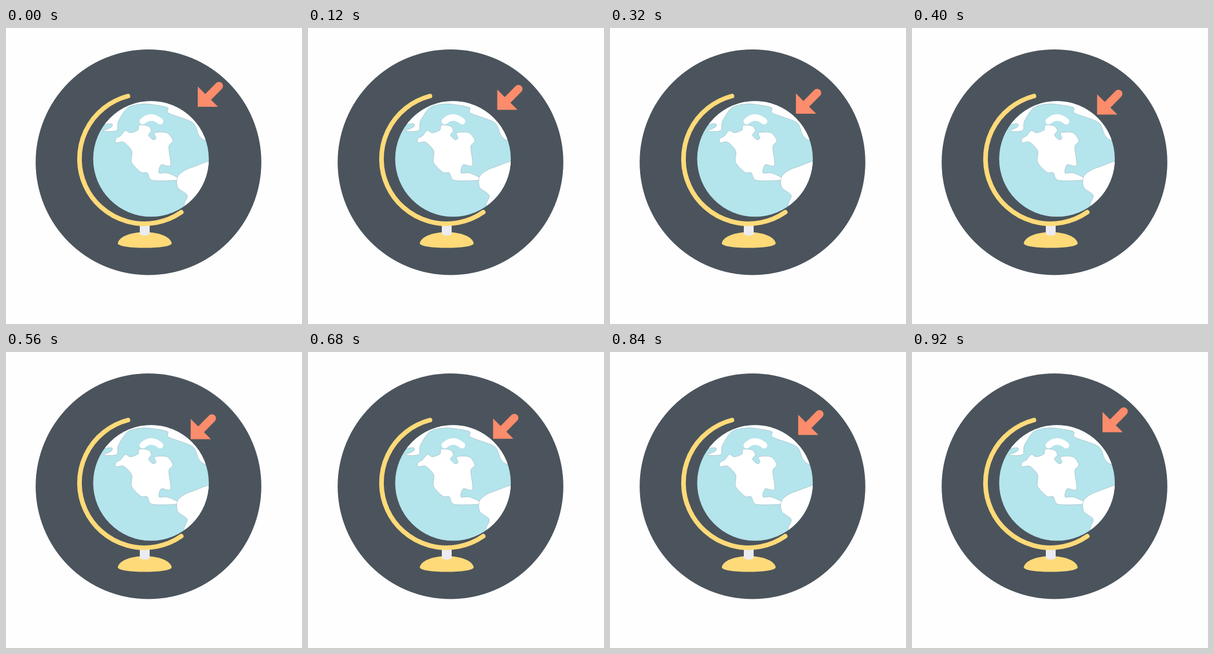
Write an HTML page that moves like this. It is 511 px wide and 511 px high and loops after 960 ms.

```html
<!DOCTYPE html>
<html lang="en">
<head>
<meta charset="utf-8">
<title>Globe</title>
<style>
  html, body { margin: 0; width: 100%; height: 100%; overflow: hidden; background: #fefefe; }
  svg { display: block; width: 100%; height: 100%; }
</style>
</head>
<body>
<svg viewBox="0 0 511 511">
  <clipPath id="ball"><circle cx="250.3" cy="226" r="99.8"/></clipPath>
  <circle cx="246" cy="231.7" r="194.8" fill="#4b545c"/>
  <path d="M193 371.500C195 360.500 214 352.500 239.500 352.500S284 360.500 286 371.500C286 377 264 379.500 239.500 379.500S193 377 193 371.500Z" fill="#ffda79"/>
  <path d="M231 340H248V356Q239.500 361 231 356Z" fill="#ebebf1"/>
  <path d="M210.500 117.500A112 112 0 1 0 302.500 318" fill="none" stroke="#ffda79" stroke-width="8" stroke-linecap="round"/>
  <circle cx="250.3" cy="226" r="99.8" fill="#b4e4ec"/>
  <g clip-path="url(#ball)">
    <g id="land" fill="#fff" stroke="#8ba5ac" stroke-width=".5"></g>
    <path d="M236 161Q250 148 266 161" fill="none" stroke="#fff" stroke-width="11" stroke-linecap="round"/>
  </g>
  <g id="arrow" fill="#fb8c6c">
    <path d="M331 101V136H366Z"/>
    <path d="M346 122L367.700 100" stroke="#fb8c6c" stroke-width="14" stroke-linecap="round"/>
  </g>
</svg>
<script>
  // Key points of each coast; corners beyond the rim are clipped by the globe.
  const coasts = [
    '140,168 180,165 182,171 168,178 191,177 194,161 211,137 240,131 278,137 281,147 322,163 333,185 346,194 380,190 250,80',
    '190,191 198,186 206,177 215,181 228,176 230,168 245,169 251,177 246,185 254,193 259,190 257,181 278,181 288,195 281,205 284,237 268,236 264,250 276,250 288,254 298,262 253,263 244,250 233,249 217,232 217,212 203,197 190,198',
    '295,262 300,252 320,241 380,227 350,310 309,308 313,289 297,276'
  ];

  // Closed curve through the points, slightly rounded.
  function curve(text) {
    const p = text.split(' ').map(s => s.split(',').map(Number));
    const at = i => p[(i + p.length) % p.length];
    const handle = (i, s) => at(i).map((v, k) => v + s * (at(i + 1)[k] - at(i - 1)[k]) / 7);
    return 'M' + p[0] + p.map((_, i) =>
      'C' + [handle(i, 1), handle(i + 1, -1), at(i + 1)].join(' ')).join('') + 'Z';
  }

  const land = document.getElementById('land');
  for (const coast of coasts) {
    const path = document.createElementNS('http://www.w3.org/2000/svg', 'path');
    path.setAttribute('d', curve(coast));
    land.append(path);
  }

  const LOOP = 960, STEP = 40, ARRIVE = 520, LEAVE = 600;
  const arrow = document.getElementById('arrow');

  // 0 = away from the globe, 1 = touching it.
  function progress(t) {
    if (t < ARRIVE) return Math.sin(Math.PI / 2 * t / ARRIVE);
    if (t < LEAVE) return 1;
    return Math.cos(Math.PI / 2 * (t - LEAVE) / (LOOP - LEAVE));
  }

  const start = performance.now();
  function draw(now) {
    const t = Math.floor(Math.max(0, now - start) % LOOP / STEP) * STEP;
    const k = progress(t);
    arrow.setAttribute('transform', `translate(${-12.2 * k} ${14.5 * k})`);
    requestAnimationFrame(draw);
  }
  draw(start);
</script>
</body>
</html>
```
